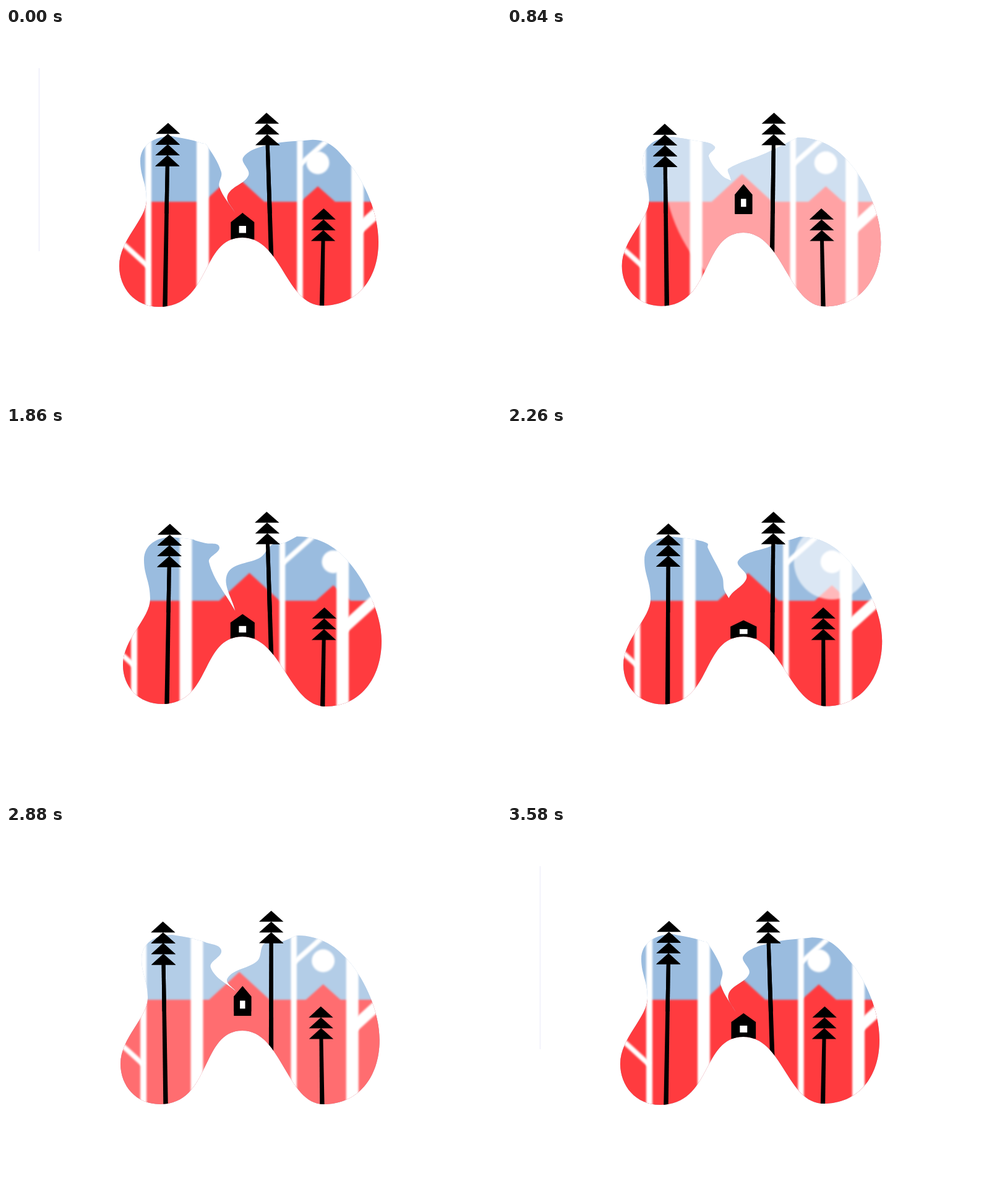
Write an HTML page with a canvas that moves like this. It is 800 by 600 pixels and loops after 3600 ms.

```html
<!DOCTYPE html>
<html>
<head>
<meta charset="utf-8">
<style>
  html, body { margin: 0; width: 100%; height: 100%; overflow: hidden; background: #fff; }
  canvas { display: block; }
</style>
</head>
<body>
<canvas id="stage" width="800" height="600"></canvas>
<script>
const ctx = document.getElementById('stage').getContext('2d');
const LOOP = 3600, JUMP = 1800, PUFF = 1200;

const { PI, min, max, sin, cos, exp, hypot } = Math;
const clamp = x => min(1, max(0, x));
const ease = x => (1 - cos(PI * clamp(x))) / 2;
const ramp = (t, from, to) => ease((t - from) / (to - from));
const hump = (t, from, to) => sin(PI * clamp((t - from) / (to - from)));

// From one lean to the other at time `turn`, and back by the end of the jump
function sway(p, turn, from, to) {
  return from + (to - from) * (p < turn ? ramp(p, 0, turn) : ramp(p, JUMP, turn));
}

// House, hill and smoke tip: crouch, leap, land
function jump(p) {
  const crouch = hump(p, 0, 760), land = hump(p, 1300, JUMP);
  const fly = ramp(p, 500, 790) - ramp(p, 1150, 1330);
  const lifted = ramp(p, 460, 520) - ramp(p, 1270, 1340);
  const x = clamp((p - 520) / 770);
  const hill = 339 - 8 * lifted + 17 * land;
  const bottom = hill + 3 - 34 * 4 * x * (1 - x);
  const sx = 1 + .12 * crouch + .38 * land - .26 * fly;
  const sy = 1 - .33 * crouch - .32 * land + .12 * fly;
  const tipY = 299 + .75 * (bottom - 43 * sy - 299) - 16 * crouch;
  return { hill, bottom, sx, sy, tip: [370 + (302 - tipY) * .1, tipY] };
}

// Turning points of the smoke edges, rising and spreading with age
function puff(age, tip) {
  const born = ramp(age, -.3, -.1);
  const point = (x, y, top, gap) => [x, max(top, min(y, tip[1] - gap))];
  const leftTop = x => 183 + .27 * (x - 304);
  const dipX = 321 + 31 * exp(-2.2 * (age + .12));
  const bulgeX = max(306, 348 - 62 * max(0, age - .5));
  return {
    left: [
      point(bulgeX, 233 - 80 * age, leftTop(bulgeX), 25),
      point(dipX, 257 - 70 * age, leftTop(dipX), 14)
    ],
    right: [
      point(365 - 7 * born + 85 * max(0, age - .7), 271 - 62 * age, 190, 12),
      point(360 + (32 + 36 * age) * born, 238 - 50 * age, 188, 25)
    ]
  };
}

// Smooth curve through points, continuing from the first one
function spline(path, points) {
  const n = points.length - 1;
  const dir = i => {
    const a = points[max(0, i - 1)], b = points[min(n, i + 1)];
    const d = hypot(b[0] - a[0], b[1] - a[1]) || 1;
    return [(b[0] - a[0]) / d, (b[1] - a[1]) / d];
  };
  for (let i = 0; i < n; i++) {
    const a = points[i], b = points[i + 1], u = dir(i), v = dir(i + 1);
    const s = hypot(b[0] - a[0], b[1] - a[1]) / 3;
    path.bezierCurveTo(a[0] + u[0] * s, a[1] + u[1] * s, b[0] - v[0] * s, b[1] - v[1] * s, ...b);
  }
}

function landShape(e, hill, tip, age) {
  const path = new Path2D();
  const young = puff(age, tip), old = puff(age + 1, tip);
  const pull = max(0, cos(2 * PI * (age - .12)));
  const crestX = 470 + 35 * pull, crestY = 177 + 5 * pull;
  const r = 5 * e, l = 6 * e, d = 3 * e;

  path.moveTo(...tip);
  spline(path, [tip, ...young.right, ...old.right, [crestX, crestY]]);
  path.bezierCurveTo(crestX + .45 * (557 - crestX), crestY, 536, 196, 557, 222);
  path.bezierCurveTo(580, 250, 602 + r, 300, 602 + r, 346);
  path.bezierCurveTo(602 + r, 408, 566 + r, 449 + d, 512 + r, 449 + d);
  path.bezierCurveTo(452 + r, 449 + d, 446, hill, 382, hill);
  path.bezierCurveTo(314, hill, 332, 451 - d, 247 + l, 451 - d);
  path.bezierCurveTo(208 + l, 451 - d, 183 + l, 420, 183 + l, 385);
  path.bezierCurveTo(183 + l, 342, 227 + l, 310, 227 + l, 278);
  path.bezierCurveTo(227 + l, 250, 217 + l, 240, 217 + l, 215);
  path.bezierCurveTo(217 + l, 189, 240 + l, 175 + d, 268, 175 + d);
  spline(path, [[268, 175 + d], [303, 182], ...old.left, ...young.left, tip]);
  return path;
}

function polygon(color, ...points) {
  ctx.fillStyle = color;
  ctx.beginPath();
  points.forEach(p => ctx.lineTo(...p));
  ctx.fill();
}

function disc(x, y, r, color) {
  ctx.fillStyle = color;
  ctx.beginPath();
  ctx.arc(x, y, r, 0, 2 * PI);
  ctx.fill();
}

function birch(x, width, x1, y1, x2, y2, branch) {
  ctx.fillStyle = ctx.strokeStyle = '#fff';
  ctx.fillRect(x - width / 2, 100, width, 400);
  if (!branch) return;
  ctx.lineWidth = branch;
  ctx.beginPath();
  ctx.moveTo(x + x1, y1);
  ctx.lineTo(x + x2, y2);
  ctx.stroke();
}

function pine(x, base, top, count, lean) {
  const height = base - top, crown = count * 17.4;
  ctx.save();
  ctx.transform(1, 0, -lean / height, 1, x + lean * base / height, 0);
  polygon('#000', [-3, top + crown - 2], [3, top + crown - 2], [3.8, base + 20], [-3.8, base + 20]);
  for (let i = 0; i < count; i++) {
    const y = top + i * 17.4;
    polygon('#000', [0, y], [19.7, y + 17.8], [-19.7, y + 17.8]);
  }
  ctx.restore();
}

function house(bottom, sx, sy) {
  ctx.save();
  ctx.translate(382.3, bottom);
  ctx.scale(sx, sy);
  polygon('#000', [0, -43], [19, -28], [19, 0], [-19, 0], [-19, -28]);
  ctx.fillStyle = '#fff';
  ctx.fillRect(-5.7, -22, 11.4, 11.5);
  ctx.restore();
}

function draw(t) {
  const e = ease(1 - Math.abs(t / JUMP - 1)), p = t % JUMP;
  const age = (t / PUFF + .3) % 1 - .3;
  const { hill, bottom, sx, sy, tip } = jump(p);
  const land = landShape(e, hill, tip, age);

  ctx.fillStyle = '#fff';
  ctx.fillRect(0, 0, 800, 600);

  // Faint hairline around the loop point
  ctx.globalAlpha = max(0, 1 - min(t, LOOP - t) / 400);
  ctx.fillStyle = '#e8e8f8';
  ctx.fillRect(53, 65, 1, 296);
  ctx.globalAlpha = 1;

  ctx.save();
  ctx.clip(land);
  ctx.fillStyle = '#9abcdf';
  ctx.fillRect(150, 120, 500, 360);
  ctx.filter = 'blur(1.5px)';
  const peak = 368.5 + 25 * e, moon = 504 + 25 * e;
  polygon('#ff3b3f', [100, 281], [peak - 49, 281], [peak, 236], [peak + 49, 281],
    [moon - 28, 281], [moon, 256], [moon + 28, 281], [700, 281], [700, 520], [100, 520]);
  const glow = max(0, p - 345);
  disc(moon, 217.5, .53 * glow, `rgba(255,255,255,${max(0, .65 * (1 - (glow / 870) ** 3))})`);
  disc(moon, 218, 18.5, '#fff');
  birch(230 - 23 * e, 10, -46, 344, 0, 386, 8);
  birch(318 - 27.5 * e, 20);
  birch(475 - 28.5 * e, 9.5, 0, 221, 52, 175, 8);
  birch(568 - 24 * e, 20, 0, 327, 56, 276, 17.5);
  ctx.restore();

  // Treetops may rise above the land, trunks end at its lower edge
  const sky = new Path2D();
  sky.rect(0, 0, 800, 300);
  for (const area of [land, sky]) {
    ctx.save();
    ctx.clip(area);
    pine(257 + 3 * e, 450, 153.5 + 3 * e, 4, sway(p, 1080, 5, -4.5));
    pine(428.5, 365, 137, 3, sway(p, 620, -7.5, 4));
    pine(510.5 + 1.2 * e, 450, 292, 3, sway(p, 850, 3, -3));
    house(bottom, sx, sy);
    ctx.restore();
  }
}

function tick() {
  draw(performance.now() % LOOP);
  requestAnimationFrame(tick);
}
tick();
</script>
</body>
</html>
```
